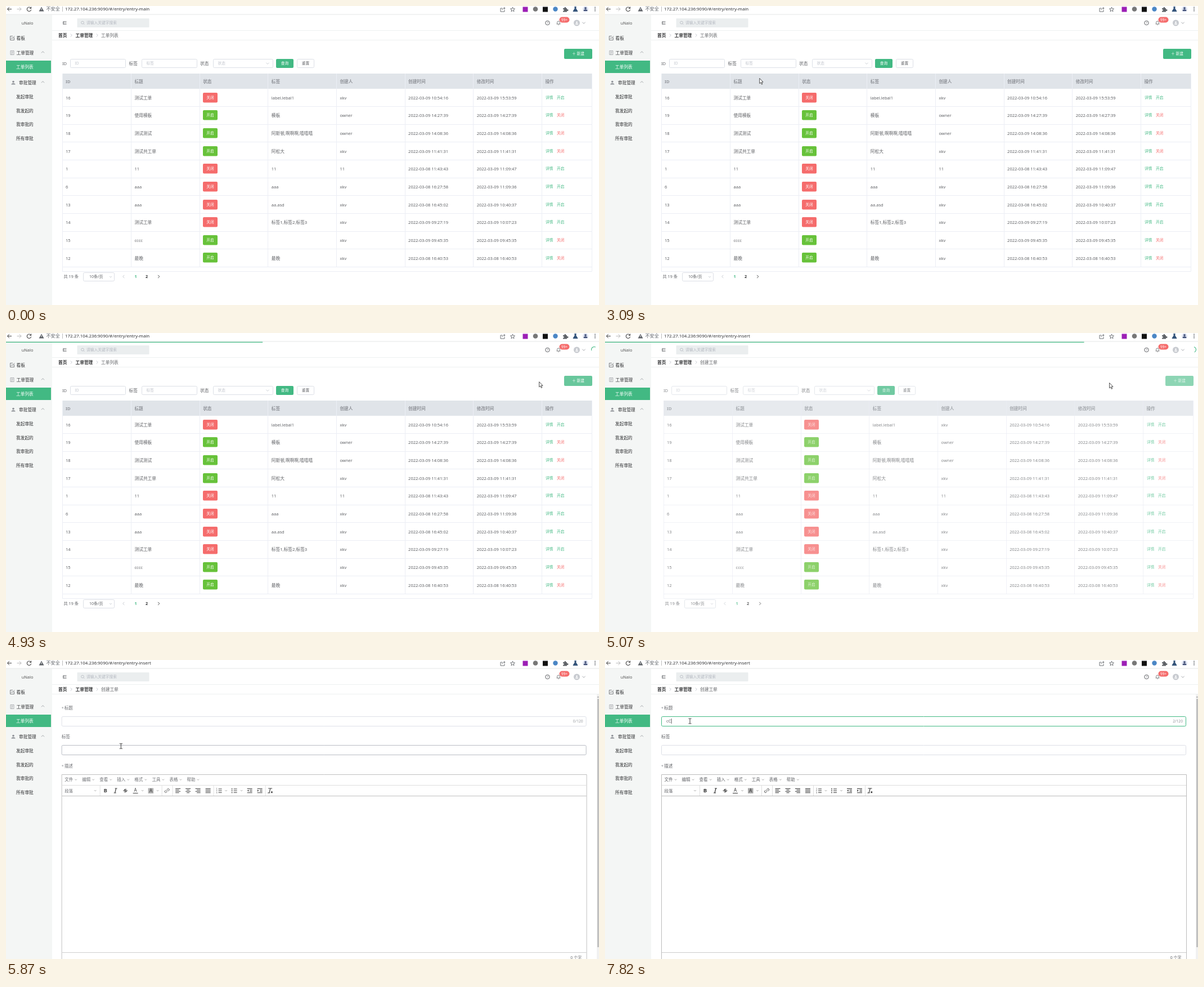
Recreate the animation shown at these times as an HTML page with a canvas. Size 1054 by 531 pixels, loop 8000 ms.

```html
<!DOCTYPE html>
<html lang="zh">
<head>
<meta charset="utf-8">
<style>
html, body { margin: 0; width: 100%; height: 100%; overflow: hidden; background: #fff }
canvas { display: block }
</style>
</head>
<body>
<canvas id="stage" width="1054" height="531"></canvas>
<script>
const c = document.getElementById('stage').getContext('2d');
const LOOP = 8000, LEAVE = 4982, ENTER = 5545, FADE = 500, SLIDE = 16.5;
const FONT = '"Noto Sans", "Noto Sans CJK SC", "Noto Sans CJK", sans-serif';
const GREEN = '#42b983', RED = '#f56c6c', TEXT = '#606266', DARK = '#303133',
      MUTED = '#909399', PALE = '#c0c4cc', LINE = '#ebeef5', FIELD = '#dcdfe6';
const HOST = '172.27.104.236:9090/#/entry/entry-';

// Pointer positions: time, x, y
const MOVES = [
  [190, 997, 507], [400, 800, 400], [660, 545, 270], [860, 545, 270], [1270, 551, 148],
  [1550, 604, 136], [1760, 604, 136], [1890, 608, 136], [2160, 608, 136], [2620, 625, 126],
  [2710, 625, 126], [3090, 275, 128], [3230, 179, 128], [3510, 253, 117], [3570, 253, 117],
  [3710, 177, 102], [3850, 177, 102], [4180, 973, 105], [4530, 1015, 84], [4740, 1015, 84],
  [5070, 898, 88], [5400, 300, 160], [5560, 300, 160], [5870, 204.5, 153], [6200, 151, 108.5]
];

const ROWS = `16|测试工单|0|label.lebal1|xkv|09 10:54:16|09 15:53:59
19|使用模板|1|模板|owner|09 14:27:39|09 14:27:39
18|测试测试|1|阿斯顿,啊啊啊,嘻嘻嘻|owner|09 14:08:36|09 14:08:36
17|测试共工单|1|阿松大|xkv|09 11:41:31|09 11:41:31
1|11|0|11|11|08 11:43:43|09 11:09:47
6|aaa|0|aaa|xkv|08 16:27:58|09 11:09:36
13|aaa|0|aa.asd|xkv|08 16:45:02|09 10:40:37
14|测试工单|0|标签1,标签2,标签3|xkv|09 09:27:19|09 10:07:23
15|cccc|1||xkv|09 09:45:35|09 09:45:35
12|最晚|1|最晚|xkv|08 16:40:53|08 16:40:53`.split('\n').map(r => r.split('|'));
const COLS = ['ID', '标题', '状态', '标签', '创建人', '创建时间', '修改时间', '操作'];
const colX = i => i ? 222.5 + (i - 1) * 121.65 : 100;

let pointer, now;
const clamp = v => Math.max(0, Math.min(1, v));
const progress = (from, to) => clamp((now - from) / (to - from));

// CSS "ease": cubic-bezier(.25, .1, .25, 1)
function ease(p) {
  let lo = 0, hi = 1, s = 0;
  for (let i = 0; i < 20; i++) {
    s = (lo + hi) / 2;
    if (.75 * s * (1 - s) + s ** 3 < p) lo = s; else hi = s;
  }
  return .3 * s * (1 - s) ** 2 + 3 * (1 - s) * s * s + s ** 3;
}

function text(str, x, y, color = TEXT, size = /[一-龥]/.test(str) ? 7.7 : 7.5, align = 'left', weight = 400) {
  c.font = `${weight} ${size}px ${FONT}`;
  c.textAlign = align;
  c.fillStyle = color;
  c.fillText(str, x, y + size * .36);
}

function box(x, y, w, h, fill, stroke, r = 0) {
  c.beginPath();
  c.roundRect(x, y, w, h, r);
  if (fill) { c.fillStyle = fill; c.fill(); }
  if (stroke) { c.strokeStyle = stroke; c.lineWidth = 1; c.stroke(); }
}

const dot = (x, y, r, fill, stroke) => box(x - r, y - r, 2 * r, 2 * r, fill, stroke, r);
const hline = (x, y, w, color = LINE) => box(x, y, w, 1, color);
const vline = (x, y, h, color = LINE) => box(x, y, 1, h, color);

function icon(x, y, d, stroke, fill, width = 1) {
  const path = new Path2D(d);
  c.save();
  c.translate(x, y);
  c.lineWidth = width;
  if (fill) { c.fillStyle = fill; c.fill(path); }
  if (stroke) { c.strokeStyle = stroke; c.stroke(path); }
  c.restore();
}

const chevron = (x, y, color = PALE, dir = 1, s = 2.6) =>
  icon(x, y, `M${-s} ${-dir * s / 2}L0 ${dir * s / 2}L${s} ${-dir * s / 2}`, color, null, .8);
const angle = (x, y, color = PALE, dir = 1) =>
  icon(x, y, `M${-dir * 1.3} -2.6L${dir * 1.3} 0L${-dir * 1.3} 2.6`, color, null, .9);
const caretDown = (x, y) => chevron(x, y, '#8a8a8a', 1, 1.7);

function field(x, y, w, h, hint, focused) {
  const over = pointer && pointer.x > x && pointer.x < x + w && pointer.y > y && pointer.y < y + h;
  box(x + .5, y + .5, w - 1, h - 1, '#fff', focused ? GREEN : over ? '#b4b8c0' : FIELD, 2);
  if (hint) text(hint, x + 8.5, y + h / 2, PALE, 6.7);
}

function button(x, y, w, h, label, fill, color = '#fff') {
  box(x, y, w, h, fill, null, 2);
  text(label, x + w / 2, y + h / 2, color, 6.7, 'center', 500);
}

function browserBar() {
  const ink = '#5f6368';
  hline(0, 14.5, 1054, '#e6e8e8');
  icon(6, 5.5, 'M4 0H-3.5M0 -3.5L-3.5 0L0 3.5', '#444');
  icon(23.5, 5.5, 'M-4 0H3.5M0 -3.5L3.5 0L0 3.5', '#bbb');
  icon(41, 5.5, 'M3 -2A3.7 3.7 0 1 0 3.7 1M3.6 -4V-1.3H.8', '#444', null, 1.1);
  icon(63, 5.5, 'M0 -4L4.5 4H-4.5Z', null, ink);
  box(62.5, 4, 1, 3, '#fff');
  text('不安全', 71.5, 5.5, ink, 8.1);
  vline(100, 1, 9, '#bbb');
  text(HOST + (now < LEAVE ? 'main' : 'insert'), 105, 5.5, DARK, 7.9);
  icon(883, 6, 'M-1 -2H-4V4H3V1M-1 1C-1 -2 1 -2 4 -2M2 -4L4 -2L2 0', ink, null, .9);
  icon(900.5, 6, 'M0 -4L1.2 -1.2L4 -1L1.8 .8L2.5 3.7L0 2.1L-2.5 3.7L-1.8 .8L-4 -1L-1.2 -1.2Z', ink, null, .9);
  box(918.5, 1.5, 9, 9, '#9c1fb5');
  dot(941, 5.5, 4.3, '#777');
  box(954, 1.5, 9, 9, '#111');
  dot(976.5, 5.5, 4.2, '#4a86c5');
  icon(994, 6, 'M-4 -2H-1.5A1.5 1.5 0 1 1 1.3 -2H3V.3A1.5 1.5 0 1 1 3 2.5V4.5H-4V2.3A1.3 1.3 0 1 0 -4 .2Z', null, ink);
  icon(1012, 5.5, 'M-1.5 -4H1.5M-1 -4V-1L-4 4H4L1 -1V-4', '#34547a', '#34547a');
  dot(1030, 5.5, 5, '#dfe4f2');
  dot(1030, 3.8, 1.9, '#46547a');
  icon(1030, 9, 'M-3.5 0A3.5 3 0 0 1 3.5 0Z', null, '#46547a');
  for (const y of [2.5, 5.5, 8.5]) dot(1047, y, .9, ink);
}

function person(x, y, s, color) {
  dot(x, y - 1.5 * s, 1.8 * s, color);
  icon(x, y, `M${-3.6 * s} ${3.6 * s}Q${-3.4 * s} ${s} 0 ${s}Q${3.4 * s} ${s} ${3.6 * s} ${3.6 * s}Z`, null, color);
}

function sidebar() {
  box(0, 15.5, 82, 516, '#f4f6f5');
  text('uNalo', 38, 30.5, '#555', 7.4, 'center');
  icon(11, 57, 'M3.5 -1V3.5H-3.5V-3.5H1M-2 1.5L-.5 -1L1 .5L4 -3.5', TEXT, null, .8);
  text('看板', 18.5, 57.5, DARK);
  icon(11, 83, 'M-3 -3.5H3V3.5H-3ZM-1.5 -1.5H1.5M-1.5 .3H1.5M-1.5 2H.5', MUTED, null, .7);
  text('工单管理', 18.5, 83, DARK);
  chevron(65.5, 82, MUTED, -1);
  box(0, 97, 80, 22, GREEN);
  text('工单列表', 18, 108, '#fff');
  person(13, 136, 1, MUTED);
  text('审批管理', 23, 136, DARK);
  chevron(65.5, 135, MUTED, -1);
  ['发起审批', '我发起的', '我审批的', '所有审批'].forEach((s, i) => text(s, 18, 161.5 + i * 24.5, DARK));
}

function header() {
  icon(104, 30, 'M-3 -2.5H3.5M-.5 0H3.5M-3 2.5H3.5M-3.2 0L-1.5 -1.3V1.3Z', TEXT, null, .8);
  box(126.5, 22, 128, 16, '#ebeeef', null, 1);
  icon(136, 29.5, 'M2.4 0A2.4 2.4 0 1 1 -2.4 0A2.4 2.4 0 1 1 2.4 0M1.8 1.8L3.5 3.5', '#b4b8c0', null, .8);
  text('请输入关键字搜索', 143, 30, '#b4b8c0', 6.75);
  dot(962.5, 30, 3.7, null, TEXT);
  text('?', 962.5, 30, TEXT, 6, 'center');
  icon(982, 30, 'M-3.3 2H3.3M-2.4 2V-.5A2.4 2.6 0 0 1 2.4 -.5V2M-.7 3.5H.7', TEXT, null, .8);
  box(983.5, 19.5, 18, 10, RED, null, 5);
  text('99+', 992.5, 24.5, '#fff', 6.3, 'center');
  dot(1014.5, 30, 5.5, '#c8cbd0');
  person(1014.5, 30, .75, '#fff');
  chevron(1027, 30, MUTED);
  hline(82, 43, 972, '#eef0f0');
  text('首页', 93, 52, DARK, 7.7, 'left', 600);
  angle(116, 52);
  text('工单管理', 123.5, 52, DARK, 7.7, 'left', 600);
  angle(162, 52);
  text(now < LEAVE ? '工单列表' : '创建工单', 169, 52);
  hline(82, 60, 972, '#eef0f0');
}

function listPage() {
  button(992, 76, 50, 18, '＋ 新建', now > 4380 ? '#68c79c' : GREEN);
  text('ID', 100, 102);
  field(114, 94, 99, 16, 'ID');
  text('标签', 218.5, 102);
  field(241, 94, 99, 16, '标签');
  text('状态', 345, 102);
  field(368, 94, 107, 16, '状态');
  chevron(465, 102);
  button(480, 94, 31, 16, '查询', GREEN);
  field(517, 94, 31, 16);
  text('重置', 532.5, 102, TEXT, 6.7, 'center', 500);

  box(100, 120, 941.5, 27, '#e0e4e9');
  COLS.forEach((name, i) => text(name, colX(i) + 6, 134, MUTED, 7.6, 'left', 600));
  ROWS.forEach(([id, title, open, label, user, created, changed], i) => {
    const top = 147 + i * 31.65, y = top + 16, x = n => colX(n) + 6;
    if (pointer && now < 4900 && pointer.y > top && pointer.y < top + 31.6) box(100, top, 941.5, 31.6, '#f5f7fa');
    text(id, x(0), y);
    text(title, x(1), y);
    button(350, Math.round(top + 6.6), 26, 17.5, +open ? '开启' : '关闭', +open ? '#67c23a' : RED);
    text(label, x(3), y);
    text(user, x(4), y);
    text('2022-03-' + created, x(5), y);
    text('2022-03-' + changed, x(6), y);
    text('详情', 959, y - .7, GREEN, 6.7);
    text(+open ? '关闭' : '开启', 979, y - .7, +open ? RED : GREEN, 6.7);
    hline(100, Math.round(top + 31), 941.5);
  });
  for (let i = 0; i < 8; i++) vline(Math.round(colX(i) - .5), 120, i ? 343 : 351);
  vline(1041, 120, 351);
  hline(100, 471, 941.5);

  text('共 19 条', 102.5, 480.5, TEXT, 7.2);
  field(137, 473, 56, 16);
  text('10条/页', 148, 480.5, TEXT, 7);
  chevron(186, 481, PALE, 1, 2);
  angle(209, 480.5, PALE, -1);
  text('1', 230.5, 480.5, GREEN, 7.2, 'center', 700);
  text('2', 250, 480.5, DARK, 7.2, 'center', 700);
  angle(271.5, 480.5, DARK);
}

// Horizontal strokes for align and list icons: [start, end] per line
const strokes = (x, spans) =>
  spans.forEach(([a, b], i) => hline(x + a, 228 + i * 2.4, b - a, '#333'));

function toolbar() {
  const ink = '#333';
  text('段落', 105.5, 232, TEXT, 7.4);
  for (const x of [160, 244, 271, 392.5, 420]) caretDown(x, 232);
  for (const x of [168, 278, 297, 370, 462]) vline(x, 223, 18, '#ddd');
  text('B', 178, 232, ink, 9.5, 'center', 800);
  icon(196, 232, 'M-1 -4H3M-3 4H1M1 -4L-1 4', ink, null, 1.2);
  text('S', 213.5, 232, ink, 9.5, 'center', 600);
  hline(209.5, 231.5, 8, ink);
  text('A', 231.5, 231, ink, 8, 'center');
  hline(227, 236, 9, ink);
  box(254, 227.5, 9.5, 9.5, '#aaa');
  text('A', 258.8, 232, ink, 8, 'center');
  icon(287.5, 232, 'M-.5 -1.5L1.5 -3.5A2 2 0 0 1 4 -1L2 1M.5 1.5L-1.5 3.5A2 2 0 0 1 -4 1L-2 -1M-1.5 1.5L1.5 -1.5', '#555');
  strokes(307, [[-4.5, 4.5], [-4.5, 2], [-4.5, 4.5], [-4.5, 2]]);
  strokes(325, [[-4.5, 4.5], [-2.5, 2.5], [-4.5, 4.5], [-2.5, 2.5]]);
  strokes(342.5, [[-4.5, 4.5], [-2, 4.5], [-4.5, 4.5], [-2, 4.5]]);
  strokes(360.5, [[-4.5, 4.5], [-4.5, 4.5], [-4.5, 4.5], [-4.5, 4.5]]);
  [0, 1, 2].forEach(i => {
    const y = 228.5 + i * 3.2;
    text(i + 1, 376, y + .4, ink, 3.6, 'center');
    hline(379, y, 6, ink);
    dot(403, y + .5, .9, ink);
    hline(406, y, 6, ink);
  });
  for (const [x, dir] of [[434.5, -1], [452.5, 1]]) {
    strokes(x, [[-4.5, 4.5], [0, 4.5], [0, 4.5], [-4.5, 4.5]]);
    icon(x - 3, 232, `M${-dir * 1.2} -2L${dir * 1.2} 0L${-dir * 1.2} 2Z`, null, ink);
  }
  icon(470.5, 232, 'M-3 -4H4M.8 -4L-1.4 4M-4 4H0M2 1.5L4.5 4M4.5 1.5L2 4', ink, null, 1.1);
}

function formPage() {
  const typed = now < 6830 ? '' : now < 7100 ? 'c' : now < 7560 ? 'cc' : now < 7820 ? 'c' : 'cC';
  const focused = now >= 6340;
  const required = (label, y) => {
    text('*', 100, y + .8, MUTED, 7);
    text(label, 105, y, TEXT);
  };
  required('标题', 85);
  field(100, 100, 933, 18, '', focused);
  text(typed, 109, 108.5, TEXT, 7.5);
  if (focused) box(109.3 + c.measureText(typed).width, 104, .8, 9, DARK);
  text(typed.length + '/120', 1027, 109, MUTED, 6.7, 'right');
  text('标签', 100, 136.5);
  field(100, 151, 933, 18);
  required('描述', 188);

  box(100.5, 203.5, 933, 340, '#fff', '#bbb');
  ['文件', '编辑', '查看', '插入', '格式', '工具', '表格', '帮助'].forEach((name, i) => {
    text(name, 105.5 + i * 31.05, 212.5, TEXT, 7.5);
    caretDown(125.5 + i * 31.05, 212.5);
  });
  hline(101, 222, 932, '#ddd');
  toolbar();
  hline(101, 241, 932, '#bbb');
  hline(101, 519, 932, '#ccc');
  text('0 个字', 1024.5, 528.5, TEXT, 7, 'right');
}

function fadedPage(draw, shift, alpha) {
  c.save();
  c.globalAlpha = alpha;
  c.translate(shift, 0);
  draw();
  c.restore();
}

function pages() {
  if (now < LEAVE + FADE) {
    const leave = ease(progress(LEAVE, LEAVE + FADE));
    fadedPage(listPage, SLIDE * leave, 1 - leave);
  } else if (now >= ENTER) {
    const enter = ease(progress(ENTER, ENTER + FADE));
    fadedPage(formPage, SLIDE * (enter - 1), enter);
    box(1050, 61, 4, 470, '#f1f1f1');
    box(1051, 69, 3, 441, '#c1c1c1');
    icon(1052.3, 65.5, 'M-1.5 1L0 -1L1.5 1Z', null, '#888');
  }
}

function loadingBar() {
  if (now < 4790 || now > 5400) return;
  const width = now < 5070 ? 850 * progress(4770, 5070) : 850 + 204 * progress(5070, 5200);
  c.save();
  c.globalAlpha = 1 - progress(5220, 5400);
  box(0, 15.8, width, 1.3, GREEN);
  const start = (now - 5070) / 400 * 2 * Math.PI - 1.3;
  c.beginPath();
  c.arc(1045.5, 29.5, 5, start, start + 2.4);
  c.strokeStyle = GREEN;
  c.lineWidth = 1.1;
  c.stroke();
  c.restore();
}

function findPointer() {
  if (now < MOVES[0][0]) return null;
  const i = MOVES.findIndex(m => m[0] > now);
  if (i < 0) return { x: 151, y: 108.5 };
  const [t0, x0, y0] = MOVES[i - 1], [t1, x1, y1] = MOVES[i], p = (now - t0) / (t1 - t0);
  return { x: x0 + (x1 - x0) * p, y: y0 + (y1 - y0) * p };
}

function drawPointer() {
  if (!pointer) return;
  const { x, y } = pointer;
  if (now > 5590 || now > 3660 && now < 3880)
    icon(x, y, 'M-2.5 -4.5H-.6L0 -4L.6 -4.5H2.5M0 -4V4M-2.5 4.5H-.6L0 4L.6 4.5H2.5', '#222', null, .9);
  else if (now > 4380 && now < 4790)
    icon(x, y, 'M-1 0Q0 -1 1 0V4L4.5 5Q5.5 5.5 5 8L4 11H-1.5L-4 7Q-4 5.5 -2.5 6L-1 7Z', '#222', '#fff', .8);
  else
    icon(x, y, 'M.4 .4V9.6L2.5 7.7L4.1 11.2L5.6 10.5L4 7.1H6.8Z', '#222', '#fff', .8);
}

function frame() {
  now = performance.now() % LOOP;
  pointer = findPointer();
  box(0, 0, 1054, 531, '#fff');
  pages();
  sidebar();
  header();
  browserBar();
  loadingBar();
  drawPointer();
  requestAnimationFrame(frame);
}
frame();
</script>
</body>
</html>
```
